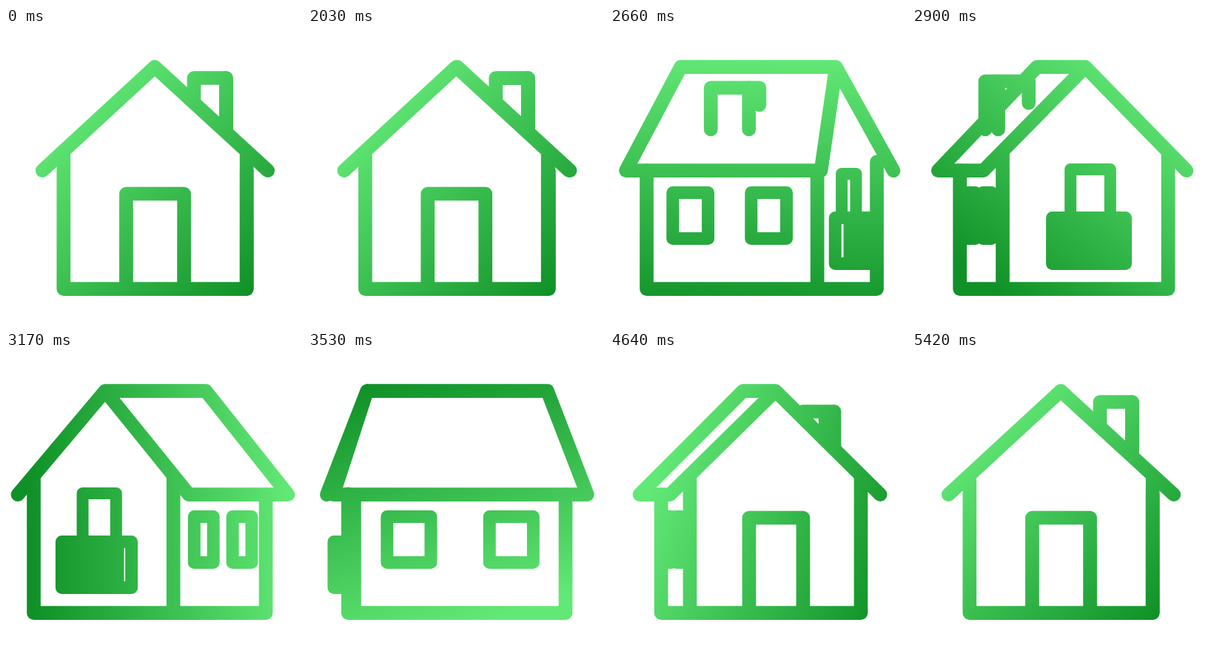
An HTML page with a canvas that plays this animation: 400x400 px, repeating every 5.45 s.

```html
<!DOCTYPE html>
<html lang="en">
<head>
<meta charset="utf-8">
<title>Turning house</title>
<style>
html, body { margin: 0; width: 100%; height: 100%; overflow: hidden; background: #fff; }
canvas { display: block; }
</style>
</head>
<body>
<canvas id="stage" width="400" height="400"></canvas>
<script>
const ctx = document.getElementById('stage').getContext('2d');
const LOOP = 5450, TURN_START = 2030, STEP = 30;
const CX = 201.5, RIDGE = 52.7, EAVE = 192.7, GROUND = 352.7;

// Smooth curve through the points (xs, ys); flat means it starts and ends at rest.
function curve(xs, ys, flat) {
  const last = xs.length - 1;
  const slope = i => {
    if (flat && (i === 0 || i === last)) return 0;
    const a = Math.max(i - 1, 0), b = Math.min(i + 1, last);
    return (ys[b] - ys[a]) / (xs[b] - xs[a]);
  };
  return x => {
    if (x <= xs[0]) return ys[0];
    if (x >= xs[last]) return ys[last];
    let i = 0;
    while (x > xs[i + 1]) i++;
    const h = xs[i + 1] - xs[i], s = (x - xs[i]) / h, r = 1 - s;
    return r * r * ((1 + 2 * s) * ys[i] + s * h * slope(i)) +
           s * s * ((1 + 2 * r) * ys[i + 1] - r * h * slope(i + 1));
  };
}

const turn = curve([2000, 2660, 3170, 3530, 4100, 4310, 4880, 5420],
                   [0, 109, 220, 268.3, 318.5, 334, 354.5, 360], true);
const shade = curve([2000, 2660, 3170, 3530, 4100, 5420],
                    [45, 92, 178, 253, 343, 405], true);

// Offsets from the centre towards the visible gable: 0 = gable view, 1 = side view.
const byView = (...ys) => curve([0, 0.455, 0.79, 1], ys);
const shape = {
  gableEave: byView(152.3, 186, 181.5, 175.5),
  cornerEave: byView(-152.3, -42.5, 84, 175.5),
  sideEave: byView(-152.3, -180, -180, -175.5),
  gableWall: byView(123.7, 164.5, 159, 146),
  cornerWall: byView(-123.7, -22, 79, 145),
  sideWall: byView(-123.7, -150, -152, -146),
  nearApex: byView(0.5, 69, 104, 123.5),
  farApex: byView(0.5, -70, -106, -123.5),
  wallTop: byView(169, 169, 181, 193),
  cornerTop: byView(169, 169, 193, 193),
  porch: byView(0, 19, 20, 22)
};

function path(points, closed) {
  ctx.beginPath();
  points.forEach(p => ctx.lineTo(p[0], p[1]));
  if (closed) ctx.closePath();
}
function line(...points) { path(points); ctx.stroke(); }
function blank(...points) {
  path(points, true);
  ctx.save();
  ctx.fillStyle = '#fff';
  ctx.fill();
  ctx.restore();
}
function box(x1, y1, x2, y2, solid) {
  path([[x1, y1], [x2, y1], [x2, y2], [x1, y2]], true);
  if (solid) ctx.fill();
  ctx.stroke();
}

function chimney(angle) {
  const c = Math.cos(angle), s = Math.sin(angle);
  const top = 67.5 + (s > 0 ? 14 : -60) * s;
  const [near, far] = c > 0 ? [-36, 18.5] : [18.5, -36];
  const at = (across, along, y) => [CX + across * c + along * s, y];
  line(at(96, far, 137), at(96, far, top), at(96, near, top),
       at(52.5, near, top), at(52.5, near, 100 + 4 * Math.abs(s)));
  line(at(96, near, top), at(96, near, 137));
}

function draw(time) {
  const degrees = turn(time) % 360, quarter = Math.floor(degrees / 90);
  const part = degrees / 90 - quarter;
  const view = quarter % 2 ? 1 - part : part;
  const dir = quarter % 2 ? 1 : -1;
  const back = quarter === 1 || quarter === 2;
  const angle = degrees * Math.PI / 180;
  const X = offset => CX + dir * offset;
  const v = {};
  for (const key in shape) v[key] = shape[key](view);

  ctx.clearRect(0, 0, 400, 400);
  const a = shade(time) * Math.PI / 180, gx = Math.cos(a), gy = Math.sin(a);
  const paint = ctx.createLinearGradient(222 - 160 * gx, 200 - 160 * gy,
                                         222 + 190 * gx, 200 + 190 * gy);
  paint.addColorStop(0, '#62e876');
  paint.addColorStop(1, '#109127');
  ctx.strokeStyle = ctx.fillStyle = paint;
  ctx.lineCap = ctx.lineJoin = 'round';
  ctx.lineWidth = 18.7;

  const near = [X(v.nearApex), RIDGE], far = [X(v.farApex), RIDGE];
  const gable = [X(v.gableEave), EAVE], corner = [X(v.cornerEave), EAVE];
  const side = [X(v.sideEave), EAVE];

  // On the far slope the chimney is covered by the roof.
  const hidden = degrees > 180;
  if (hidden) {
    chimney(angle);
    blank(near, corner, gable);
    blank(far, near, corner, side);
  }

  // Roof
  line(gable, near, corner, side, far, near);

  // Walls
  const gableX = X(v.gableWall), cornerX = X(v.cornerWall), sideX = X(v.sideWall);
  line([gableX, v.wallTop], [gableX, GROUND], [sideX, GROUND], [sideX, EAVE]);
  line([cornerX, v.cornerTop], [cornerX, GROUND]);
  if (!hidden) chimney(angle);

  // Front door
  const width = v.gableWall - v.cornerWall;
  const onGable = f => X(v.cornerWall + f * width);
  if (!back) {
    const shift = 0.03 * view;
    const left = onGable(0.342 + shift), right = onGable(0.658 + shift);
    line([left, GROUND], [left, 224], [right, 224], [right, GROUND]);
  }

  // Windows
  ctx.lineWidth = 17;
  const onSide = f => sideX + f * (cornerX - sideX);
  for (const f of [0.153, 0.51 + 0.13 * view])
    box(onSide(f), 222.5, onSide(f + 0.207), 284.5);

  // Back entrance with its block standing out from the wall
  if (back) {
    const root = onGable(0.3), front = root + dir * v.porch;
    box(root, 256.5, front, 318.5);
    box(front, 256.5, onGable(0.7) + dir * v.porch, 318.5, true);
    ctx.lineWidth = 16;
    const left = onGable(0.41), right = onGable(0.65);
    const top = 191 + 6 * Math.max(0, (view - 0.455) / 0.335);
    line([left, 256.5], [left, top], [right, top], [right, 256.5]);
  } else {
    const reach = v.porch - 0.3 * width;
    if (reach > 0) box(sideX, 256.5, sideX - dir * reach, 318.5, true);
  }
}

const start = performance.now();
function frame() {
  // The house rests, then turns in even steps.
  const time = (performance.now() - start) % LOOP;
  const steps = Math.floor((time - TURN_START) / STEP);
  draw(steps < 0 ? 0 : TURN_START + steps * STEP);
  requestAnimationFrame(frame);
}
frame();
</script>
</body>
</html>
```
